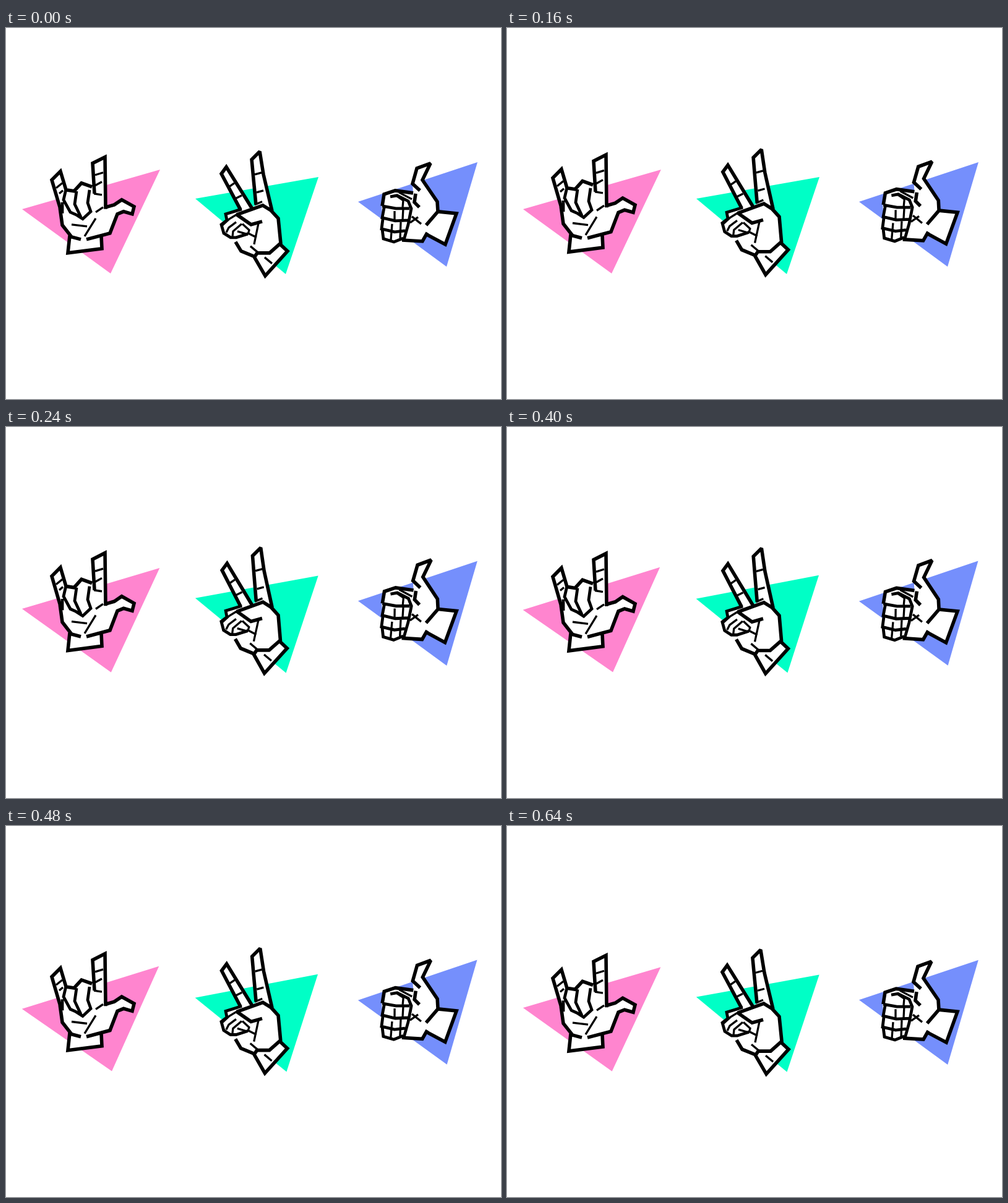
Recreate the animation shown at these times as an HTML page. Size 800x600 px, loop 0.72 s.

```html
<!DOCTYPE html>
<html lang="en">
<head>
<meta charset="utf-8">
<title>Hand signs</title>
<style>
  html, body { margin: 0; width: 100%; height: 100%; overflow: hidden; background: #fff; }
  svg { display: block; width: 100%; height: 100%; }
  .fill { fill: #fff; }
  .bold { fill: none; stroke: #000; stroke-width: 5.6; stroke-miterlimit: 2; }
  .mid { fill: none; stroke: #000; stroke-width: 4.8; stroke-miterlimit: 2; }
  .fine { fill: none; stroke: #000; stroke-width: 3.3; }
</style>
</head>
<body>
<svg id="stage" viewBox="0 0 800 600"></svg>
<script>
const LOOP = 720, STEP = 80;

// tilt: triangle swing in degrees; lift, stretch and lean: hand motion away from its wrist
const signs = [
  {
    color: '#ff85cf', triangle: '26,293 249,229 169,397', center: [148, 306], tilt: -1.5,
    lift: 2.8, stretch: .02, lean: 0, wrist: 365,
    fill: 'M100 365L103 338L91 319L74 246L88 232L98 262L110 264L122 251L139 257L140 219L160 209L161 290L175 286L187 278L207 289L204 301L190 297L180 301L168 332L154 337L155 358Z',
    bold: 'M121 342L106 338L91 319L87 290L74 246L88 232L97 262L110 264L122 251L139 257M143 268L140 219L160 209L161 293M161 290L175 286L187 278L207 289L204 301L190 297L180 301L168 332L130 342M103 336L100 364L155 357L154 337',
    mid: 'M97 261L93 278L104 298L113 302L124 309L137 297L132 283L135 262M114 264L111 285L121 306M91 282L91 300',
    fine: 'M81 259L91 251M86 268L92 263M144 238L157 234M144 255L155 249M142 268L155 270M106 318L131 321M127 337L145 308M145 298L157 290'
  },
  {
    color: '#00ffc6', triangle: '306,276 505,241 452,398', center: [421, 305], tilt: -1,
    lift: 3, stretch: .011, lean: .017, wrist: 402,
    fill: 'M381 294L348 236L356 225L397 290L404 287L397 213L410 200L416 237L430 295L440 308L444 348L456 361L419 401L401 371L379 362L371 346L361 339L352 332L348 319L357 312L355 301Z',
    bold: 'M379 294L348 236L356 225L397 291M404 286L400 245L397 213L410 200L416 237L430 296M414 313L396 318L373 302L415 287L428 295L440 308L444 348L426 364L406 364L402 370L380 361L371 346M441 348L455 361L419 401L401 370',
    mid: 'M381 293L355 301L357 311L348 318L352 332L363 339L372 339L391 333',
    fine: 'M359 258L369 251M371 276L381 271M402 237L413 234M405 266L416 263M402 286L414 281M408 316L401 350M391 332L405 339M395 353L407 363M418 371L430 381M349 320L361 309L374 301M356 331L360 323L372 314M366 338L367 329L381 317M382 317L393 327L391 334M374 329L391 334'
  },
  {
    color: '#758ffc', triangle: '569,281 762,217 712,386', center: [681, 295], tilt: -.45,
    lift: 1.6, stretch: .021, lean: .014, wrist: 351,
    fill: 'M610 268L629 262L658 267L657 252L664 227L686 219L673 246L697 281L698 297L728 300L710 350L681 335L673 345L642 344L627 347L609 341L606 325L609 308L607 289Z',
    bold: 'M668 290L660 282L662 268M669 263L657 252L664 227L686 219L673 246L697 281L698 297L679 319M698 297L728 300L710 350L680 334M681 331L673 345L640 343M658 267L629 263L611 269L608 288',
    mid: 'M608 288L630 292L652 292M611 291L608 307L629 312L651 311M609 309L607 325L628 330L645 328M608 325L610 341L627 346L642 340M621 273L632 271L650 280L655 292L650 318L643 343',
    fine: 'M630 271L642 279L641 290M628 296L628 310M642 291L641 310M624 317L622 343M638 314L637 340M653 315L666 306M656 305L671 317M635 266L656 277'
  }
];

const stage = document.getElementById('stage');

function add(parent, tag, attrs = {}) {
  const el = document.createElementNS('http://www.w3.org/2000/svg', tag);
  for (const key in attrs) el.setAttribute(key, attrs[key]);
  return parent.appendChild(el);
}

for (const sign of signs) {
  sign.back = add(stage, 'polygon', { points: sign.triangle, fill: sign.color });
  sign.hand = add(stage, 'g');
  for (const layer of ['fill', 'fine', 'mid', 'bold']) {
    add(sign.hand, 'path', { class: layer, d: sign[layer] });
  }
}

const wave = (time, low) => (1 - Math.cos((time - low) / LOOP * 2 * Math.PI)) / 2;

function draw(now) {
  const time = Math.floor(now % LOOP / STEP) * STEP;
  const rise = wave(time, -70) - .05;
  const swing = wave(time, 75) - .1;
  for (const s of signs) {
    const lean = s.lean * rise, stretch = s.stretch * rise;
    const shift = lean * 310;
    const drop = -rise * s.lift - stretch * s.wrist;
    s.hand.setAttribute('transform', `matrix(1 0 ${-lean} ${1 + stretch} ${shift} ${drop})`);
    s.back.setAttribute('transform', `rotate(${s.tilt * swing} ${s.center})`);
  }
}

const start = performance.now();
function tick() {
  draw(performance.now() - start);
  requestAnimationFrame(tick);
}
tick();
</script>
</body>
</html>
```
